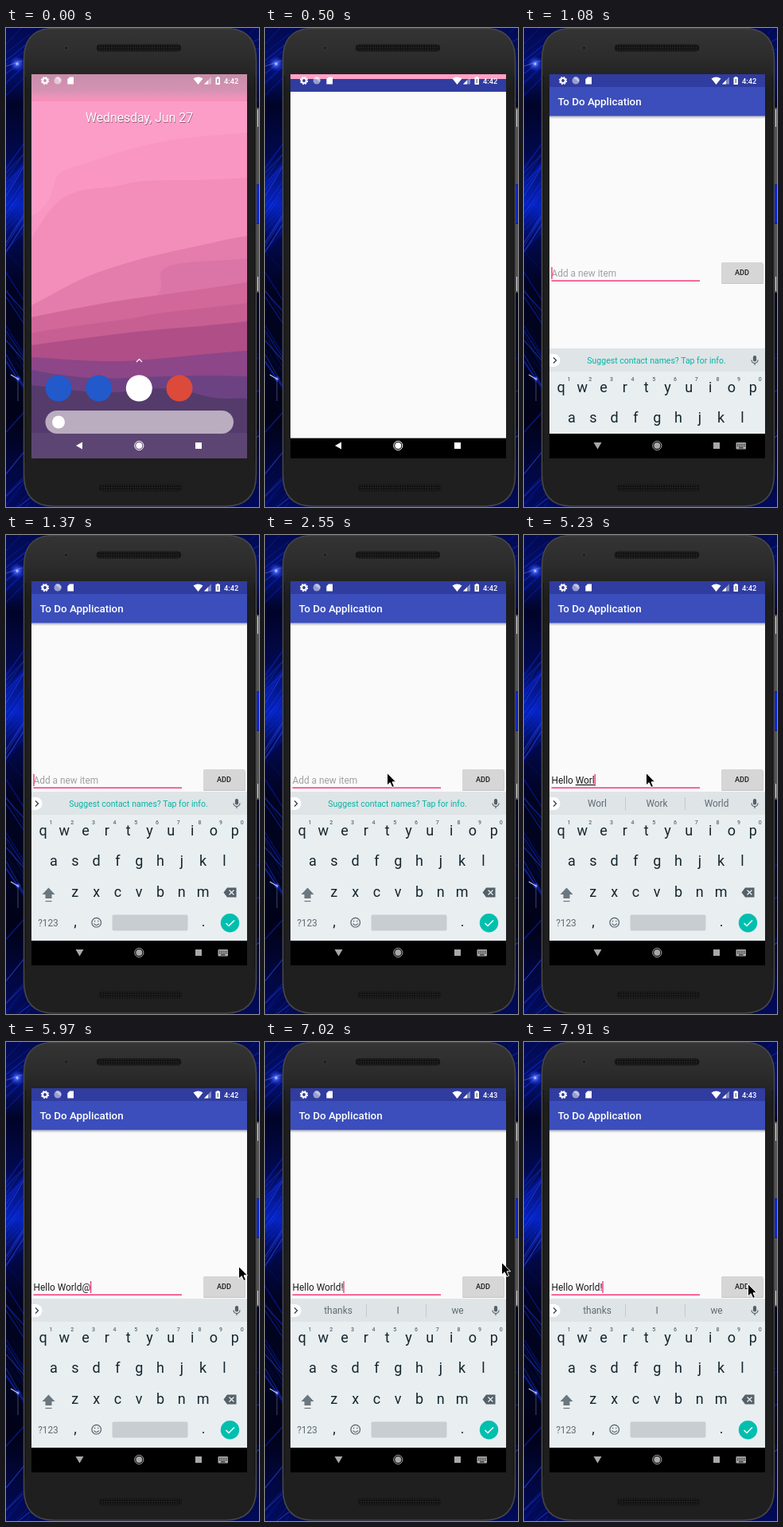
Recreate the animation shown at these times as an HTML page. Size 318 by 601 pixels, loop 8000 ms.

```html
<!DOCTYPE html>
<html lang="en">
<head>
<meta charset="utf-8">
<title>To do list on a phone</title>
<style>
  html, body { margin: 0; width: 100%; height: 100%; overflow: hidden; background: #02030f; }
  svg { display: block; width: 318px; height: 601px; font-family: Roboto, sans-serif; }
  text { white-space: pre; }
  .mid { text-anchor: middle; }
  .bold { font-weight: 500; }
  .body { font-size: 11.86px; }
  .key { font-size: 18px; fill: #14262e; }
  .digit { font-size: 7px; fill: #5c6970; font-weight: 500; }
  .word { fill: #5f6b73; }
  .offer { font-size: 10.5px; fill: #00b5a4; }
</style>
</head>
<body>
<svg viewBox="0 0 318 601">
  <defs>
    <clipPath id="screen"><path d="M32 58H303V540H32Z"/></clipPath>
    <clipPath id="aboveNav"><path d="M32 58H303V509H32Z"/></clipPath>
    <linearGradient id="shell" x2="0" y2="1">
      <stop offset="0" stop-color="#343434"/><stop offset=".06" stop-color="#2c2c2c"/>
      <stop offset=".13" stop-color="#1d1d1d"/><stop offset="1" stop-color="#1f1f1f"/>
    </linearGradient>
    <linearGradient id="desk" x2="0" y2="1">
      <stop offset="0" stop-color="#020a52"/><stop offset=".09" stop-color="#03106a"/>
      <stop offset=".16" stop-color="#010328"/><stop offset=".27" stop-color="#020a50"/>
      <stop offset=".37" stop-color="#0524c4"/><stop offset=".44" stop-color="#02094c"/>
      <stop offset=".55" stop-color="#01031f"/><stop offset=".7" stop-color="#01041f"/>
      <stop offset=".82" stop-color="#010218"/><stop offset="1" stop-color="#020b5c"/>
    </linearGradient>
    <linearGradient id="topShade" x2="0" y2="1">
      <stop offset="0" stop-color="#c78eab"/><stop offset=".7" stop-color="#d592b2"/><stop offset="1" stop-color="#ee94bb"/>
    </linearGradient>
    <linearGradient id="dropShade" x2="0" y2="1">
      <stop offset="0" stop-opacity=".28"/><stop offset="1" stop-opacity="0"/>
    </linearGradient>
    <radialGradient id="spark">
      <stop offset="0" stop-color="#e8edff"/><stop offset=".25" stop-color="#4d6cff" stop-opacity=".8"/>
      <stop offset="1" stop-color="#1030ff" stop-opacity="0"/>
    </radialGradient>
    <pattern id="mesh" width="3" height="3" patternUnits="userSpaceOnUse">
      <path d="M0 0H3V3H0Z" fill="#111"/><path d="M0 0H1.5V1.5H0Z" fill="#2b2b2b"/>
    </pattern>
  </defs>

  <path d="M0 0H318V601H0Z" fill="url(#desk)"/>
  <g id="streaks" fill="none"></g>
  <circle cx="14" cy="45" r="10" fill="url(#spark)"/>
  <circle cx="15" cy="440" r="4" fill="url(#spark)"/>
  <g stroke="#b9c6ff" fill="none">
    <path d="M6 435L16 441" stroke-width="1.200"/>
    <path d="M15 441V468M0 48L20 41" stroke-width=".7" opacity=".5"/>
  </g>
  <path d="M315 100H318V196H315ZM315 246H318V332H315Z" fill="#555"/>
  <path d="M316.5 102V124M316.5 312V330" stroke="#ddd"/>
  <path d="M316.5 197V245" stroke="#0a24d8" stroke-width="3"/>

  <path d="M60 .5H276C302 .5 314.5 14 314.5 40V560C314.5 586 302 600 276 600H60C34 600 22.500 586 22.500 560V40C22.500 14 34 .5 60 .5Z" fill="url(#shell)" stroke="#464646" stroke-width="1.6"/>
  <path d="M24.500 60V545M312.500 60V545" stroke="#151515"/>
  <circle cx="75.500" cy="25" r="2.600" fill="#202020" stroke="#444" stroke-width=".7"/>
  <rect x="114" y="21" width="106" height="8" rx="4" fill="url(#mesh)" stroke="#161616"/>
  <rect x="117" y="573" width="104" height="8" rx="4" fill="url(#mesh)" stroke="#161616"/>

  <g clip-path="url(#screen)">
    <g id="home">
      <path d="M32 58H303V540H32Z" fill="#fc9dc8"/>
      <path d="M32 236C48 228 56 214 60 198S68 180 86 174C125 162 150 152 190 144S265 135 303 131V540H32Z" fill="#f996c1"/>
      <path d="M32 264C48 240 58 218 82 208S120 204 150 196S215 194 303 188V540H32Z" fill="#f38db9"/>
      <path d="M32 348C60 334 85 318 112 308S180 286 220 278S275 265 303 261V540H32Z" fill="#e47cac"/>
      <path d="M190 334C204 322 184 308 202 300S250 294 303 289V330Z" fill="#dc75a7"/>
      <path d="M32 363C75 354 110 347 150 341S235 330 303 319V540H32Z" fill="#d26899"/>
      <path d="M32 383C85 372 130 370 170 362S250 352 303 345V540H32Z" fill="#c75f92"/>
      <path d="M32 398C75 392 120 386 165 381S255 374 303 368V540H32Z" fill="#b04e88"/>
      <path d="M32 413C70 415 105 419 145 418S240 409 303 405V540H32Z" fill="#8d4687"/>
      <path d="M32 429C80 438 110 441 150 439S250 435 303 437V540H32Z" fill="#6d4283"/>
      <path d="M32 448C75 453 110 460 150 456S205 449 240 459S280 463 303 465V540H32Z" fill="#543b6b"/>
      <path d="M32 508H303V540H32Z" fill="#fff" opacity=".05"/>
      <path d="M32 58H303V87H32Z" fill="url(#topShade)"/>
      <path d="M32 87H303V92H32Z" fill="#f490ba"/>
      <g class="mid" font-size="15.8">
        <text x="168" y="119" fill="#5a2a45" opacity=".65">Wednesday, Jun 27</text>
        <text x="167.500" y="118" fill="#fff">Wednesday, Jun 27</text>
      </g>
      <path d="M164 419L167.500 415.500L171 419" fill="none" stroke="#fff" stroke-width="1.2"/>
      <circle cx="66" cy="452" r="16.500" fill="#2259cb"/>
      <circle cx="116.700" cy="452" r="16.500" fill="#2259cb"/>
      <circle cx="167.300" cy="452" r="16.500" fill="#fff"/>
      <circle cx="218" cy="452" r="16.500" fill="#dc4a3a"/>
      <rect x="49.500" y="480" width="236.500" height="29" rx="14.500" fill="#b9adbf"/>
      <circle cx="66" cy="494.500" r="8" fill="#fff"/>
    </g>

    <g id="app">
      <path id="peek" d="M32 58H303V66H32Z" fill="#ffa2c9"/>
      <g id="window">
        <path d="M32 58H303V74H32Z" fill="#303c9f"/>
        <path d="M32 74H303V509H32Z" fill="#fafafa"/>
      </g>
      <g id="content" clip-path="url(#aboveNav)">
        <path d="M32 110.500H303V114H32Z" fill="url(#dropShade)"/>
        <path d="M32 74H303V110.500H32Z" fill="#3b4ebb"/>
        <text x="42.500" y="97.300" font-size="13.4" class="bold" fill="#fff">To Do Application</text>
        <g id="inputRow">
          <text id="hint" class="body" x="34.500" y="312" fill="#a0a0a0">Add a new item</text>
          <text id="typed" class="body" x="34.500" y="312" fill="#1a1a1a"><tspan></tspan><tspan text-decoration="underline"></tspan></text>
          <path d="M34.500 317.300H221" stroke="#f5387d" stroke-width="1.500"/>
          <path id="caret" d="M0 300V315" stroke="#f5387d" stroke-width="1.400"/>
          <rect x="248" y="295.500" width="53" height="25.500" rx="1.500" opacity=".22"/>
          <rect x="248" y="294" width="52.500" height="26" rx="1.500" fill="#d6d6d6"/>
          <text class="mid bold" x="274" y="310.300" font-size="9.2" fill="#1a1a1a">ADD</text>
        </g>
        <g id="keyboard">
          <path d="M32 322H303V509H32Z" fill="#e9eef1"/>
          <path d="M32 322H303V351H32Z" fill="#dfe4e7"/>
          <path d="M32 329H37.500A8 8 0 0 1 37.500 345H32Z" fill="#fff"/>
          <path d="M37 333.500L40.500 337L37 340.500" fill="none" stroke="#37474f" stroke-width="1.400"/>
          <g fill="none" stroke="#546169" stroke-width="1.200">
            <rect x="288.500" y="331.500" width="3" height="6.500" rx="1.500" fill="#546169"/>
            <path d="M286 336.500A4 4 0 0 0 294 336.500M290 340.500V343"/>
          </g>
          <g id="words" class="mid body word"></g>
          <g id="keys" class="mid"></g>
          <path d="M53.500 442.500L61.500 451H57.500V456H49.500V451H45.500Z" fill="#6b777e"/>
          <path d="M49.500 459.500H57.500" stroke="#6b777e" stroke-width="1.200"/>
          <path d="M278 442.500H289.500V454.500H278L273.500 448.500Z" fill="#546169"/>
          <path d="M280.500 445.500L286.500 451.500M286.500 445.500L280.500 451.500" stroke="#e9eef1" stroke-width="1.300"/>
          <g fill="none" stroke="#546169" stroke-width="1.200">
            <circle cx="113.700" cy="486.200" r="5.800"/>
            <path d="M110.500 487.500Q113.700 491.500 116.900 487.500M111.600 483.700V485.200M115.800 483.700V485.200"/>
          </g>
          <rect x="133.500" y="476.500" width="95" height="20" rx="2" fill="#c8cdd1"/>
          <circle cx="281.500" cy="486.700" r="11.700" fill="#00bfae"/>
          <path d="M276.500 487L280 490.500L287 483.500" fill="none" stroke="#fff" stroke-width="1.500"/>
        </g>
      </g>
      <path id="navBar" d="M32 509H303V547H32Z"/>
      <path id="navEdge" d="M32 514.500H303" stroke="#999"/>
    </g>

    <g fill="#fff">
      <circle cx="49" cy="66" r="3" fill="none" stroke="#fff" stroke-width="2.200"/>
      <circle cx="49" cy="66" r="4.500" fill="none" stroke="#fff" stroke-width="1.300" stroke-dasharray="2 1.530"/>
      <circle cx="65" cy="66" r="4.500" opacity=".5"/>
      <path d="M62 62.500A4.500 4.500 0 0 1 69 68Z" opacity=".4"/>
      <path d="M80 61.500H85V70.500H77.300V64.300Z"/>
      <path d="M235.500 63.500Q241.500 59.500 247.500 63.500L241.500 71Z"/>
      <path d="M258 61.500V70.500H249Z" opacity=".4"/><path d="M254 65.500V70.500H249Z"/>
      <path d="M265 61H267.500V62H269V71H263.500V62H265Z"/>
      <path d="M266.200 64V69" stroke="#444" stroke-width="1"/>
      <text id="clock" x="274" y="69.500" font-size="9.3" class="bold"></text>
    </g>

    <g id="nav" fill="#fff" stroke="#fff">
      <path id="back" d="M88 524L96 519.500V528.500Z" stroke="none"/>
      <circle cx="167.300" cy="524" r="5.600" fill="none" stroke-width="1"/>
      <circle cx="167.300" cy="524" r="4" stroke="none"/>
      <path d="M238 520H246V528H238Z" stroke="none"/>
    </g>
    <g id="imeIcon">
      <rect x="266.500" y="520" width="12.500" height="8.500" rx="1" fill="#a8a8a8"/>
      <path d="M268 522.300H278M268 524.500H278" stroke="#000" stroke-dasharray="1.200 1"/>
      <path d="M270 526.800H275.500" stroke="#000"/>
    </g>
  </g>
  <path id="pointer" d="M.5 .5V16L4.200 12.700L6.800 18.500L9.500 17.400L7 11.800H11.500Z" stroke="#fff" stroke-width="1" stroke-linejoin="round"/>
</svg>
<script>
const $ = id => document.getElementById(id);
const LOOP = 8000;

// Each list holds [start, ...values]; the last entry already started applies.
const OFFER = 'offer', NONE = [];
const TYPING = [
  [0, '', '', OFFER],
  [2990, '', 'H', OFFER],
  [3290, '', 'He', ['He', 'Hey', 'Hello']],
  [3440, '', 'Hel', ['Hel', 'Hello', 'Help']],
  [3590, '', 'Hell', ['Hell', 'Hello', "He'll"]],
  [4040, '', 'Hello', ['Hello', 'Hello!', 'Hellos']],
  [4190, 'Hello ', '', NONE],
  [4340, 'Hello ', '', ['I', 'there', 'my']],
  [4780, 'Hello ', 'W', ['W', 'We', 'What']],
  [4930, 'Hello ', 'Wo', ['Wo', 'Would', 'Work']],
  [5080, 'Hello ', 'Wor', ['Wor', 'Work', 'World']],
  [5230, 'Hello ', 'Worl', ['Worl', 'Work', 'World']],
  [5380, 'Hello ', 'World', ['World', "World's", 'Worlds']],
  [5680, 'Hello World@', '', NONE],
  [6270, 'Hello ', 'World', ['World', "World's", 'Worlds']],
  [6570, 'Hello World!', '', NONE],
  [7020, 'Hello World!', '', ['thanks', 'I', 'we']]
];
const POINTER = [
  [0, -50, -50], [1960, 156, 294], [2100, 153, 298],
  [5830, 235, 290], [5970, 292, 281], [6270, 297, 276],
  [7170, 303, 262], [7320, 303, 248], [7470, 298, 266],
  [7610, 290, 288], [7760, 283, 300], [7910, 281, 303]
];
const CARET = [[0, 1], [1520, 0], [1960, 1], [2550, 0], [2990, 1]];
const KEYBOARD_DROP = [[0, 186], [1080, 80], [1230, 0]];

const at = (steps, t) => steps.findLast(step => step[0] <= t);
const show = (id, on) => $(id).style.display = on ? '' : 'none';
const shift = (id, x, y) => $(id).setAttribute('transform', `translate(${x} ${y})`);
const label = (x, y, text, cls = 'key') => `<text x="${x}" y="${y}" class="${cls}">${text}</text>`;

function buildKeys() {
  const rows = [['qwertyuiop', 46.5, 376.5], ['asdfghjkl', 60, 415], ['zxcvbnm', 86.800, 454]];
  const letters = rows.map(([chars, x0, y]) =>
    [...chars].map((c, i) => label(x0 + i * 26.8, y, c)).join('')).join('');
  const digits = [...'1234567890'].map((d, i) => label(56.5 + i * 26.7, 363, d, 'digit')).join('');
  $('keys').innerHTML = letters + digits + label(53, 491, '?123', 'body word') +
    label(87, 491, ',') + label(248, 491, '.');
}

// Fans of fine light trails: a vertical range and the slope they share.
function buildStreaks() {
  let seed = 7;
  const random = () => (seed = seed * 16807 % 2147483647) / 2147483647;
  const colors = ['#0a1fd0', '#1636ff', '#0818a0', '#2b4cff'];
  const fan = (count, top, bottom, rise, x = 0) => Array.from({ length: count }, () => {
    const y = top + random() * (bottom - top), dy = -rise * (.7 + random() * .6);
    return `<path d="M${x} ${y}q12 ${dy * .4} 30 ${dy}" stroke="${colors[random() * 4 | 0]}"
      stroke-width="${.5 + random()}" opacity="${.2 + random() * .4}"/>`;
  }).join('');
  $('streaks').innerHTML = fan(14, 20, 90, 25) + fan(36, 175, 290, 38) +
    fan(14, 280, 420, -45) + fan(16, 500, 640, 30) + fan(14, 0, 601, 20, 306);
}

function wordsMarkup(words) {
  if (words === OFFER) return label(166.5, 341, 'Suggest contact names? Tap for info.', 'offer');
  if (!words.length) return '';
  return words.map((word, i) => label(92 + i * 75, 341.300, word, '')).join('') +
    '<path d="M127.500 329V345M202.500 329V345" stroke="#c3cacf"/>';
}

let shownWords;
function drawInput(t) {
  const [, done, composing, words] = at(TYPING, t);
  const [first, second] = $('typed').children;
  first.textContent = done;
  second.textContent = composing;
  show('hint', !(done + composing));
  const end = done + composing ? $('typed').getComputedTextLength() : 0;
  shift('caret', 35 + end, 0);
  show('caret', at(CARET, t)[1]);
  if (words !== shownWords) {
    $('words').innerHTML = wordsMarkup(words);
    shownWords = words;
  }
}

function draw(t) {
  const launched = t >= 500, sliding = launched && t < 640, ready = t >= 930, typing = t >= 1080;
  show('home', !launched);
  show('app', launched);
  show('peek', sliding);
  show('navEdge', sliding);
  shift('window', 0, sliding ? 6 : 0);
  shift('navBar', 0, sliding ? 6 : 0);
  show('content', ready);
  show('keyboard', typing);
  shift('keyboard', 0, at(KEYBOARD_DROP, t)[1]);
  shift('inputRow', 0, typing ? 0 : 186);
  show('imeIcon', typing);
  $('nav').setAttribute('fill', typing ? '#a8a8a8' : '#fff');
  $('nav').setAttribute('stroke', typing ? '#a8a8a8' : '#fff');
  $('back').setAttribute('d', typing ? 'M87.500 520H97.500L92.500 528.500Z' : 'M88 524L96 519.500V528.500Z');
  $('clock').textContent = t < 6270 ? '4:42' : '4:43';
  if (ready) drawInput(t);
  const [, x, y] = at(POINTER, t);
  shift('pointer', x, y);
}

buildStreaks();
buildKeys();
const start = performance.now();
function tick() {
  draw((performance.now() - start) % LOOP);
  requestAnimationFrame(tick);
}
tick();
</script>
</body>
</html>
```
